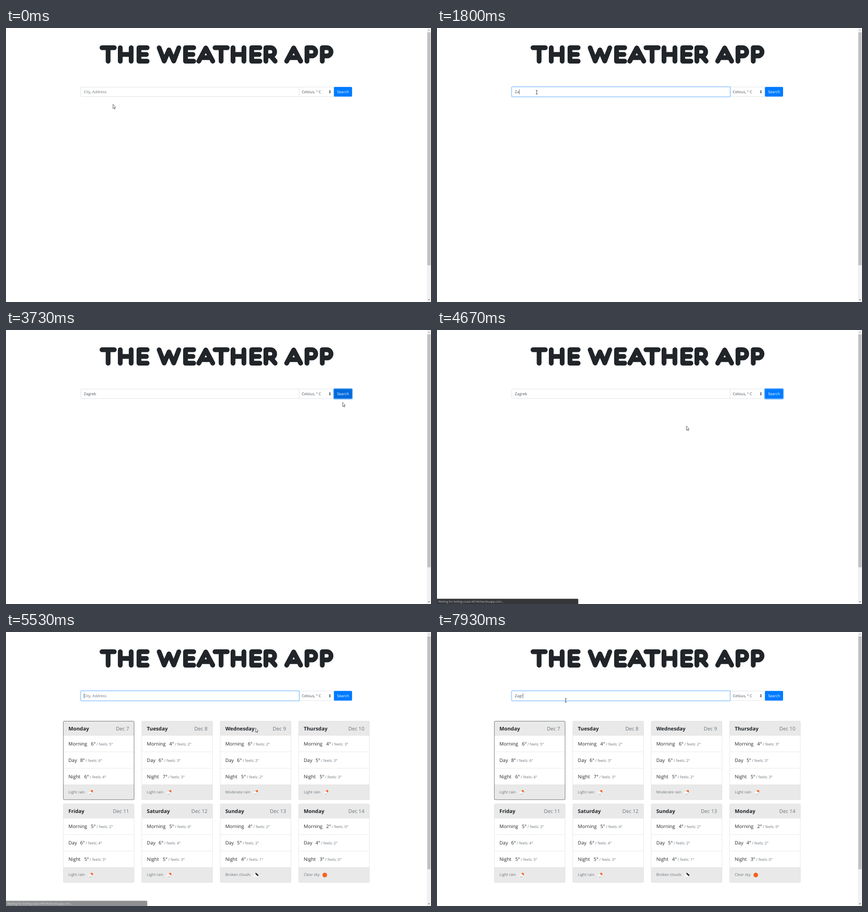
An HTML page that plays this animation: 931x601 px, repeating every 8000 ms.

```html
<!DOCTYPE html>
<html lang="en">
<head>
<meta charset="utf-8">
<title>The Weather App</title>
<style>
  html, body { margin: 0; width: 100%; height: 100%; overflow: hidden; background: #fff; }
  svg { display: block; }
  text { font: 8.3px "Open Sans", "Noto Sans", sans-serif; fill: #6c757d; text-rendering: geometricPrecision; white-space: pre; }
  .field { fill: #495057; }
  .day { font-size: 11.2px; font-weight: 700; fill: #212529; }
  .date { font-size: 11.15px; text-anchor: end; }
  .part { font-size: 10.4px; font-weight: 500; fill: #212529; }
  .status { font-size: 6.25px; fill: #c4c7cb; }
  .title { fill: none; stroke: #212529; stroke-width: 10.5; stroke-linecap: round; stroke-linejoin: round; }
</style>
</head>
<body>
<svg id="stage" width="931" height="601" viewBox="0 0 931 601">
  <g id="title" class="title" role="img" aria-label="THE WEATHER APP"></g>

  <rect x="641.8" y="129.6" width="78" height="20.7" fill="#fff" stroke="#ced4da" stroke-width=".6"/>
  <text class="field" x="648" y="143.1">Celsius, ° C</text>
  <path d="M707.2 139.2l2.3-2.8 2.3 2.8zM707.2 140.8l2.3 2.8 2.3-2.8z" fill="#343a40"/>

  <rect id="inputRing" x="162.9" y="128.5" width="480" height="22.9" rx="3" fill="none" stroke="#007bff" stroke-opacity=".25" stroke-width="1.8"/>
  <rect id="inputBox" x="163.9" y="129.6" width="478" height="20.7" rx="2" fill="#fff" stroke-width=".7"/>
  <text id="typed" x="170.6" y="143.1"></text>
  <rect id="caret" y="134.5" width=".7" height="11" fill="#333"/>

  <rect id="buttonRing" x="717.4" y="128.4" width="41.6" height="23.1" rx="3" fill="none" stroke="#007bff" stroke-opacity=".5" stroke-width="1.8"/>
  <rect id="button" x="718.3" y="129.3" width="39.8" height="21.3" rx="2"/>
  <text x="738.2" y="143.1" text-anchor="middle" style="fill:#fff">Search</text>

  <g id="cards"></g>

  <g id="status">
    <path d="M0 589.6H307.5a2 2 0 0 1 2 2V601H0z" fill="#35363a"/>
    <text class="status" x="2.7" y="597.7">Waiting for boiling-coast-44144.herokuapp.com...</text>
  </g>

  <rect x="922" width="9" height="601" fill="#f1f1f1"/>
  <rect x="923" y="9.5" width="7.2" height="511" fill="#c1c1c1"/>
  <path d="M924.5 5.8l2-2.3 2 2.3z" fill="#a3a3a3"/>
  <path d="M924.5 595.3l2 2.3 2-2.3z" fill="#505050"/>

  <g id="cursor">
    <path id="arrow" d="M.3 .4V9.8L2.4 7.8 3.8 10.9 5 10.3 3.7 7.3H6.4z" fill="#fff" stroke="#222" stroke-width=".7"/>
    <path id="beam" d="M-2 -4H2M0 -4V4M-2 4H2" stroke="#333" stroke-width=".9"/>
    <path id="hand" d="M0 0q1-.7 1.2.5V4l4 .8q1 .3.9 1.4L5.500 10H.8L-2 6.200q-.2-1.200 1-.7l1 .8z" fill="#fff" stroke="#222" stroke-width=".6"/>
  </g>
</svg>
<script>
const LOOP = 8000;
const $ = id => document.getElementById(id);

function add(parent, tag, attrs, content = '') {
  const node = document.createElementNS('http://www.w3.org/2000/svg', tag);
  for (const key in attrs) node.setAttribute(key, attrs[key]);
  node.textContent = content;
  parent.append(node);
  return node;
}

// Rounded title lettering: one centre line per letter
const bowl = 'M5.3 34.7V5.3H15.5a9 9 0 0 1 0 18H5.3';
const letters = {
  T: 'M5.3 5.3H32.2M18.7 5.3V34.7',
  H: 'M5.3 5.3V34.7M29.2 5.3V34.7M5.3 20H29.2',
  E: 'M23.2 5.3H5.3V34.7H23.2M5.3 20H21.5',
  W: 'M5.5 5.5L16.5 34.5 27 10 37.5 34.5 48.5 5.5',
  A: 'M5.3 34.7L20.7 5.8 36 34.7M12 27H29.5',
  P: bowl,
  R: bowl + 'M16 23.3L25.5 34.7'
};
const letterX = [205, 245, 286, 330, 388, 417, 452.5, 492, 533, 564, 609.5, 654, 687.5];
[...'THEWEATHERAPP'].forEach((c, i) =>
  add($('title'), 'path', { d: letters[c], transform: `translate(${letterX[i]} 38)` }));

// Forecast cards: day, date, summary, then "temperature feels" for morning, day and night
const forecast = [
  ['Monday', 7, 'Light rain', '6 5', '8 6', '6 4'],
  ['Tuesday', 8, 'Light rain', '4 2', '6 3', '7 3'],
  ['Wednesday', 9, 'Moderate rain', '6 2', '6 2', '5 2'],
  ['Thursday', 10, 'Light rain', '4 3', '5 3', '5 3'],
  ['Friday', 11, 'Light rain', '5 2', '6 4', '5 3'],
  ['Saturday', 12, 'Light rain', '5 4', '6 4', '5 3'],
  ['Sunday', 13, 'Broken clouds', '4 2', '5 2', '4 1'],
  ['Monday', 14, 'Clear sky', '2 0', '4 2', '3 0']
];
const parts = [['Morning', 60.4], ['Day', 36.8], ['Night', 45.8]];
const iconX = { 'Light rain': 60, 'Moderate rain': 77.8, 'Broken clouds': 77.8, 'Clear sky': 57.2 };
const cloud = 'M-5.5 3.500q-.4-2.600 2-2.900 .7-3 3.300-1.800 1.800 .5 1.500 2.100 2.200 .5 1.600 2.600z';

function drawIcon(parent, kind) {
  if (kind === 'Clear sky') {
    add(parent, 'circle', { r: 5, fill: '#fa5f1c' });
    return;
  }
  if (kind === 'Broken clouds') {
    add(parent, 'path', { d: 'M-1 -4.300Q1-5 2.500-3L5.800-.2Q6.300 2 4 2L0-1.500z', fill: '#151515' });
    add(parent, 'path', { d: cloud, fill: '#fff' });
    return;
  }
  add(parent, 'path', { d: 'M-1 -3.200Q2-6 4.600-3.600 5.600-1 3.600 1.200L2-1z', fill: '#fa5f1c' });
  add(parent, 'path', { d: cloud, fill: '#fff' });
  add(parent, 'path', { d: 'M-3 3l1 2M-1 3l1 2M1 3l.8 1.500', stroke: '#777', 'stroke-width': .6 });
}

function drawCard([day, date, summary, ...temps], i) {
  const x = 125.6 + i % 4 * 171.83, y = 195.6 + (i >> 2) * 181.5;
  const g = add($('cards'), 'g', { transform: `translate(${x} ${y})` });
  const text = (cls, tx, ty, s) => add(g, 'text', { class: cls, x: tx, y: ty }, s);
  add(g, 'rect', { width: 155, height: 172.2, rx: 2, fill: '#fff' });
  for (const [top, h] of [[0, 31.2], [139.5, 32.7]])
    add(g, 'rect', { y: top, width: 155, height: h, rx: 1.5, fill: '#e9e9e9' });
  for (const line of [31.2, 67.3, 103.4, 139.5])
    add(g, 'path', { d: `M0 ${line}H155`, stroke: '#d9d9d9', 'stroke-width': .6 });
  add(g, 'rect', { width: 155, height: 172.2, rx: 2, fill: 'none',
    stroke: i ? '#dcdcdc' : '#343a40', 'stroke-width': .7 });
  text('day', 11.2, 20.4, day);
  text('date', 144, 20.4, 'Dec ' + date);
  parts.forEach(([label, tx], row) => {
    const [temp, feels] = temps[row].split(' '), ty = 53.1 + row * 36.1;
    text('part', 11.2, ty, label);
    text('part', tx, ty, temp + '°');
    text('', tx + 12.2, ty, `/ feels: ${feels}°`);
  });
  text('', 11.2, 158.3, summary);
  drawIcon(add(g, 'g', { transform: `translate(${iconX[summary]} 155.8)` }), summary);
  if (summary === 'Clear sky') g.lastChild.setAttribute('transform', 'translate(57.2 156)');
}
forecast.forEach(drawCard);

// Pointer track: time, x, y
const track = [
  [0, 234, 167], [70, 234, 167], [250, 226, 151], [400, 220, 143], [600, 218.5, 141],
  [2730, 218.5, 141], [2850, 245, 128], [3000, 420, 90], [3090, 560, 79], [3220, 740, 130],
  [3330, 806, 190], [3430, 765, 165], [3530, 738, 142], [3640, 738, 142], [3730, 737, 158],
  [3900, 715, 182], [4100, 650, 196], [4330, 598, 190], [4470, 598, 190], [4670, 546, 210],
  [6130, 546, 210], [6230, 568, 208], [6400, 450, 180], [6550, 330, 155], [6670, 276.5, 146],
  [6800, 276.5, 146], [6930, 282, 150]
];
const typing = [
  [0, ''], [1530, 'Z'], [1800, 'Za'], [1970, 'Zag'], [2070, 'Zagr'], [2170, 'Zagre'], [2230, 'Zagreb'],
  [5060, ''], [7430, 'Z'], [7670, 'Za'], [7830, 'Zag'], [7930, 'Zagr']
];
const caretSteps = [
  [0, 0], [440, 1], [970, 0], [1500, 1], [2730, 0], [3260, 1], [3580, 0],
  [5060, 1], [5590, 0], [6120, 1], [6650, 0], [7190, 1]
];

const clamp = v => Math.max(0, Math.min(1, v));
const ramp = (t, start, length = 150) => clamp((t - start) / length);
const stepAt = (steps, t) => steps.findLast(s => s[0] <= t)[1];
const mix = (a, b, k) => `rgb(${a.map((v, i) => Math.round(v + (b[i] - v) * k))})`;

function pointerAt(t) {
  const i = track.findIndex(p => p[0] > t);
  if (i < 0) return track.at(-1).slice(1);
  const [a, b] = [track[i - 1], track[i]], k = (t - a[0]) / (b[0] - a[0]);
  return [a[1] + (b[1] - a[1]) * k, a[2] + (b[2] - a[2]) * k];
}

function pointerShape(x, y) {
  if (y < 129 || y > 150.6) return 'arrow';
  if (x > 164 && x < 642) return 'beam';
  return x > 718 && x < 758 ? 'hand' : 'arrow';
}

function render(t) {
  const value = stepAt(typing, t), typed = $('typed');
  typed.textContent = value || 'City, Address';
  typed.setAttribute('class', value ? 'field' : '');
  $('caret').setAttribute('x', 170.6 + (value ? typed.getComputedTextLength() : 0));
  $('caret').style.opacity = stepAt(caretSteps, t);

  const loaded = t >= 5060;
  const focus = loaded ? ramp(t, 5045) : ramp(t, 440) - ramp(t, 3580);
  $('inputRing').style.opacity = focus;
  $('inputBox').setAttribute('stroke', mix([206, 212, 218], [128, 189, 255], focus));

  $('buttonRing').style.opacity = loaded ? 0 : ramp(t, 3580);
  const hover = ramp(t, 3490) - ramp(t, 3720);
  $('button').setAttribute('fill', mix([0, 123, 255], [0, 105, 217], hover));

  $('cards').style.display = loaded ? '' : 'none';
  $('status').style.opacity = ramp(t, 3880, 120) - ramp(t, 5450, 180);

  const [x, y] = pointerAt(t), shape = pointerShape(x, y);
  $('cursor').setAttribute('transform', `translate(${x} ${y})`);
  for (const id of ['arrow', 'beam', 'hand']) $(id).style.display = id === shape ? '' : 'none';
}

const start = performance.now();
function tick() {
  render((performance.now() - start) % LOOP);
  requestAnimationFrame(tick);
}
tick();
</script>
</body>
</html>
```
